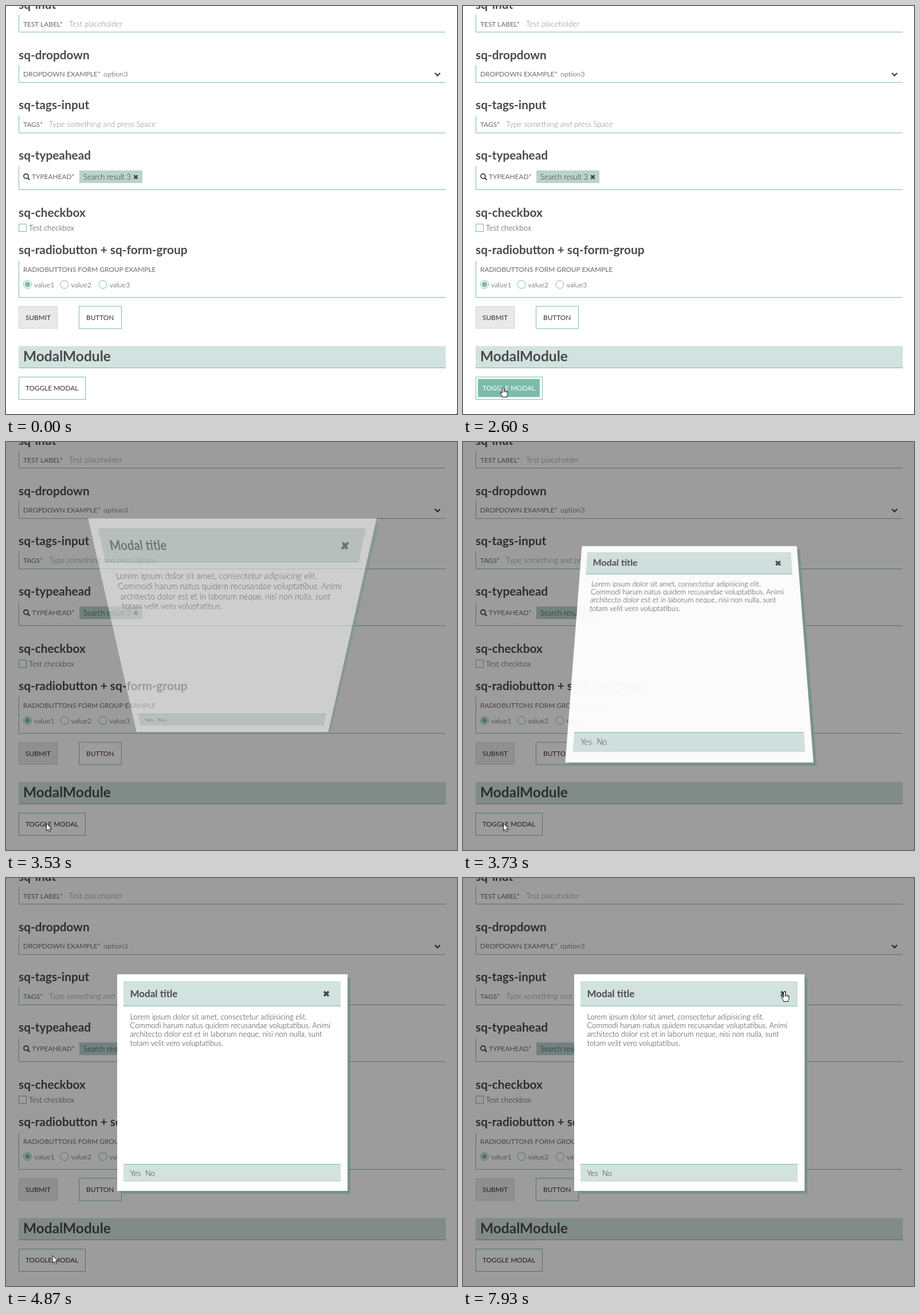
An HTML page for the animation above (8000 ms loop, 787 by 712 pixels).

```html
<!DOCTYPE html>
<html lang="en">
<head>
<meta charset="utf-8">
<title>Form and modal demo</title>
<style>
  html, body { margin: 0; width: 787px; height: 712px; overflow: hidden; background: #fff; }
  svg, #shade, #modal { position: absolute; left: 0; top: 0; }
  svg { overflow: visible; }
  text { font: 300 12.6px Lato, sans-serif; fill: #333; white-space: pre; }
  .label { font-size: 11.9px; font-weight: 400; fill: #6a6a6a; }
  .hint { font-size: 13.3px; fill: #858585; }
  .head { font-size: 20.8px; font-weight: 700; fill: #4a4a4a; }
  .banner { font-size: 24.5px; font-weight: 700; fill: #4a4a4a; }
  .title { font-size: 17px; font-weight: 700; fill: #4a4a4a; }
  .body { font-size: 13px; }
  .btn { font-size: 11.8px; font-weight: 400; }
  .line { fill: none; stroke: #7dbbab; }
  .icon { fill: none; stroke: #444; }
  .pale { fill: #d2e2de; }
  #shade { width: 787px; height: 712px; background: rgba(0, 0, 0, .39); }
  #modal { left: 194px; top: 168px; width: 402px; height: 378px; }
  #cursor path { fill: #fff; stroke: #111; stroke-linejoin: round; }
</style>
</head>
<body>
<svg id="page" width="787" height="712"></svg>
<div id="shade"></div>
<div id="modal"><svg id="dialog" width="402" height="378" viewBox="194 168 402 378"></svg></div>
<svg width="787" height="712">
  <rect id="dot" x="786" y="711" width="1" height="1"/>
  <g id="cursor">
    <path id="arrow" d="M.5.5V13.5L3.5 10.8 5.7 15.6 7.8 14.6 5.7 10H9.7Z"/>
    <path id="hand" d="M-1.5 1.2Q0-.8 1.5 1.2V6Q3.3 5 4 6.8Q5.6 5.8 6.3 7.5Q8 7 8 9V12.3Q7.8 14.3 6.7 15.3V17.5H-1.7V15.8Q-4.8 12-5 9.8Q-4 8.3-1.5 10.5ZM1.5 6V9M4 6.8V9.3M6.3 7.5V9.5"/>
  </g>
</svg>
<script>
const $ = id => document.getElementById(id);
const text = (x, y, cls, str) => `<text x="${x}" y="${y}" class="${cls}">${str}</text>`;
const path = (d, cls = 'line', width = 1) => `<path d="${d}" class="${cls}" stroke-width="${width}"/>`;
const rect = (x, y, w, h, attrs) => `<rect x="${x}" y="${y}" width="${w}" height="${h}" ${attrs}/>`;
const field = (top, bottom) => path(`M22.5 ${top}V${bottom + .5}H767`);
const button = (x, y, w) => rect(x + .5, y + .5, w - 1, 39, 'class="line"');
const cross = (x, y, r, width) =>
  path(`M${x - r} ${y - r}L${x + r} ${y + r}M${x - r} ${y + r}L${x + r} ${y - r}`, 'icon', width);
const radio = (x, i) =>
  `<circle cx="${x}" cy="486" r="7" class="line"/>` + text(x + 11.5, 490.5, '', 'value' + i);

const heads = [[4.5, 'sq-inut'], [92.5, 'sq-dropdown'], [180, 'sq-tags-input'], [268, 'sq-typeahead'],
  [367.5, 'sq-checkbox'], [433, 'sq-radiobutton + sq-form-group']];

$('page').innerHTML =
  heads.map(([y, str]) => text(22, y, 'head', str)).join('') +
  [[15, 45], [103, 133], [191, 221], [279, 320], [445, 508]].map(f => field(...f)).join('') +
  text(30, 35.5, 'label', 'TEST LABEL*') + text(110, 35.5, 'hint', 'Test placeholder') +
  text(30, 123, 'label', 'DROPDOWN EXAMPLE*') + text(170, 123, '', 'option3') +
  path('M748.5 117L753 121.5L757.5 117', 'icon', 2.4) +
  text(30, 211, 'label', 'TAGS*') + text(75, 211, 'hint', 'Type something and press Space') +
  '<circle cx="35" cy="297" r="4" class="icon" stroke-width="1.8"/>' +
  path('M38 300L41.5 303.5', 'icon', 2.2) + text(45, 302, 'label', 'TYPEAHEAD*') +
  rect(128, 287, 110, 22, 'fill="#b9d3cc"') + text(135, 302.5, 'body', 'Search result 3') +
  cross(226.5, 298.5, 3, 2.6) +
  rect(22.5, 380.5, 13, 13, 'class="line"') + text(40, 391.5, 'body', 'Test checkbox') +
  text(30, 464, 'label', 'RADIOBUTTONS FORM GROUP EXAMPLE') +
  [37.5, 102, 169].map((x, i) => radio(x, i + 1)).join('') +
  '<circle cx="37.5" cy="486" r="4.7" fill="#7dbbab"/>' +
  rect(22.5, 524.5, 67, 38, 'fill="#e9e9e9" stroke="#d0d0d0"') + text(34, 548, 'btn', 'SUBMIT') +
  button(127, 523.5, 75) + text(140, 548, 'btn', 'BUTTON') +
  rect(22, 593.5, 745.5, 38.5, 'class="pale"') + rect(22, 631, 745.5, 1, 'fill="#8fada5"') +
  text(30, 620, 'banner', 'ModalModule') +
  button(22, 647, 117) + text(34, 671, 'btn', 'TOGGLE MODAL') +
  '<g id="hover">' + rect(26, 651, 108, 31.5, 'fill="#7dbbab"') +
  '<text x="34" y="671" class="btn" style="fill:#fff">TOGGLE MODAL</text></g>';

const lines = ['Lorem ipsum dolor sit amet, consectetur adipisicing elit.',
  'Commodi harum natus quidem recusandae voluptatibus. Animi',
  'architecto dolor est et in laborum neque, nisi non nulla, sunt',
  'totam velit vero voluptatibus.'];

$('dialog').innerHTML =
  rect(200, 174, 401, 377, 'fill="#78918b"') + rect(194, 168, 402, 378, 'fill="#fff"') +
  rect(205, 180, 379, 44, 'class="pale"') + path('M205 223.5H584') +
  text(216.5, 207.5, 'title', 'Modal title') + cross(559, 202, 4, 3.4) +
  lines.map((str, i) => text(216.5, 247 + i * 15.2, 'body', str)).join('') +
  rect(205, 499, 379, 31, 'class="pale"') + path('M205 499.5H584') +
  text(216.5, 519.5, 'body', 'Yes') + text(243, 519.5, 'body', 'No');

// Damped flip around the horizontal axis
const turn = deg => `perspective(300px) rotateX(${deg}deg)`;
const flip = $('modal').animate([
  { offset: 0, transform: turn(90), opacity: 0, easing: 'ease-in' },
  { offset: .4, transform: turn(-20), easing: 'ease-in' },
  { offset: .6, transform: turn(10), opacity: 1, easing: 'ease' },
  { offset: .8, transform: turn(-5), easing: 'ease' },
  { offset: 1, transform: turn(0), opacity: 1 }
], { duration: 1060, fill: 'both' });
flip.pause();

// Pointer stops: time, x, y
const stops = [[1500, 786, 704], [1800, 470, 690], [2070, 90, 664], [2200, 62, 659], [2530, 62, 659],
  [2600, 70, 665], [4800, 70, 665], [4870, 80, 659], [5130, 257, 500], [5270, 257, 500],
  [5470, 217, 515], [5670, 217, 516], [5930, 223, 517], [6200, 223, 517], [6400, 261, 519],
  [6670, 261, 519], [6800, 257, 517], [6940, 257, 517], [7400, 430, 340], [7800, 565, 194],
  [7860, 565, 194], [7930, 561, 198], [8000, 561, 198]];
const clamp = v => Math.max(0, Math.min(1, v));

function pointer(t) {
  const i = Math.max(1, stops.findIndex(s => s[0] >= t));
  const [t0, x0, y0] = stops[i - 1], [t1, x1, y1] = stops[i];
  const k = clamp((t - t0) / (t1 - t0));
  return [x0 + (x1 - x0) * k, y0 + (y1 - y0) * k];
}

const show = (id, on) => $(id).style.display = on ? '' : 'none';

function draw(now) {
  const t = now % 8000, open = t >= 3195;
  const [x, y] = pointer(t);
  const onToggle = !open && x < 138;
  const onAnswer = open && x > 212 && x < 264 && y > 508;
  const onClose = open && x > 548 && y < 212;
  const hand = onToggle || onAnswer || onClose;

  show('dot', t < 400);
  show('shade', open);
  show('modal', open);
  show('cursor', t >= 1530);
  show('hand', hand);
  show('arrow', !hand);
  $('cursor').setAttribute('transform', `translate(${x} ${y})`);
  $('hover').style.opacity = clamp((t - 2040) / 150) * clamp((3400 - t) / 190);
  flip.currentTime = Math.max(0, t - 3110);
  requestAnimationFrame(draw);
}
requestAnimationFrame(draw);
</script>
</body>
</html>
```
